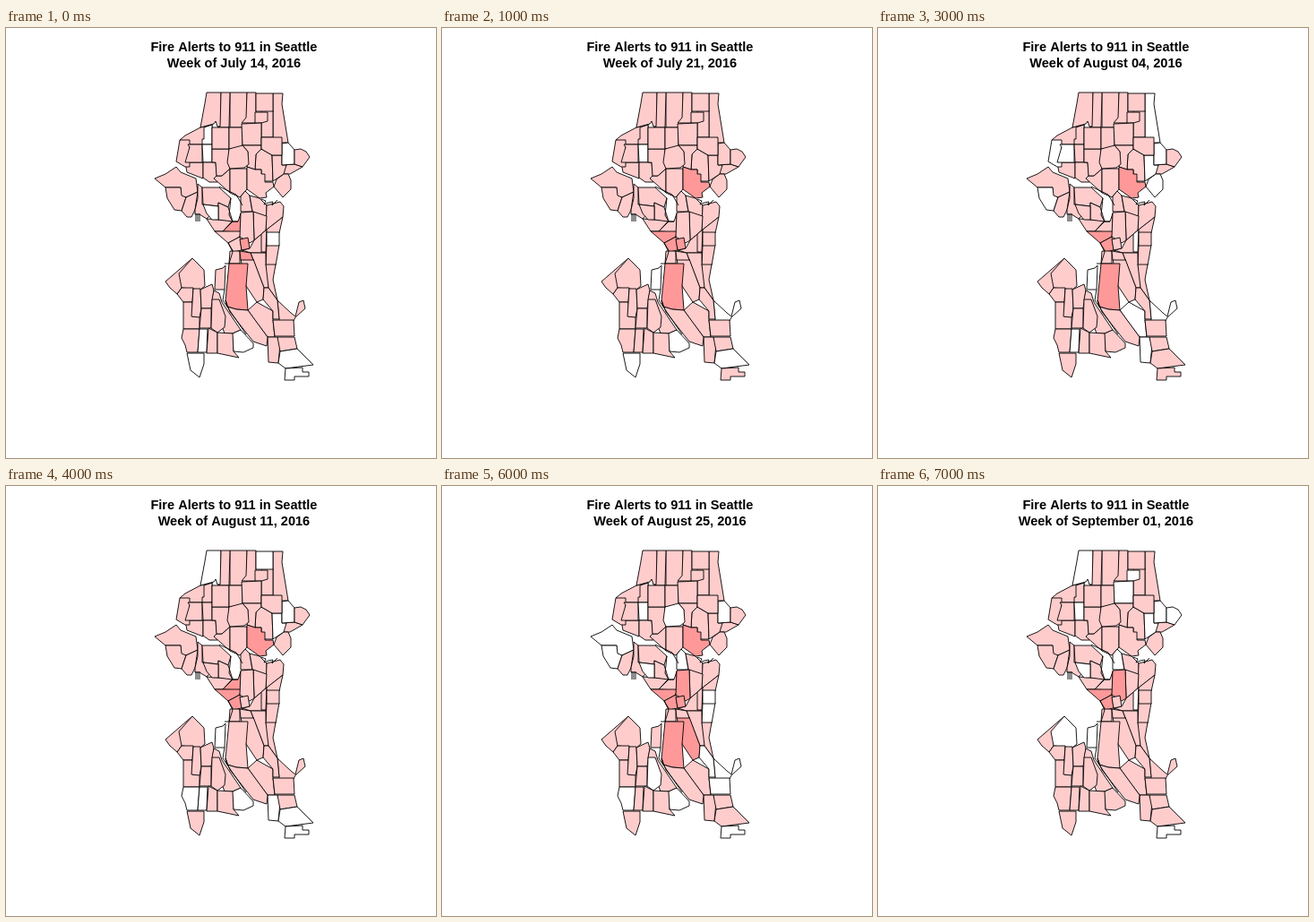
Write an HTML page with a canvas that moves like this. It is 480 px wide and 480 px high and loops after 8 s.

```html
<!DOCTYPE html>
<html>
<head>
<meta charset="utf-8">
<style>
html, body { margin: 0; width: 100%; height: 100%; overflow: hidden; background: #fff; }
canvas { display: block; width: 480px; height: 480px; }
</style>
</head>
<body>
<canvas id="map" width="480" height="480"></canvas>
<script>
const ctx = document.getElementById("map").getContext("2d");
const WEEKS = 8, WEEK_MS = 1000;
const COLORS = { w: "#ffffff", p: "#ffcccc", r: "#ff9999" };

let week = 0;

function line(points) {
  ctx.stroke(new Path2D("M" + points));
}

// Areas overlap: a later one covers the rough edges of those before it.
// One letter per week: white, pink or red.
function area(points, levels = "pppppppp") {
  const path = new Path2D("M" + points + "Z");
  ctx.fillStyle = COLORS[levels[week]];
  ctx.fill(path);
  ctx.stroke(path);
}

function northWest() {
  area("217 111 230 108V130H203L194 125 200 120", "ppwppppp");
  area("224 72H240V110H236L234 104 232 107 217 111 222 84", "ppppwppw");
  area("221 111 230 108V130H219V124H221", "wpwppppp");
  area("200 150H220V168L202 161");
  area("194 125H205V155H200L190 149 191 143", "pppwpppp");
  area("203 130H219V150H200L205 133", "pppwpppp");
  area("219 130H230V150H220", "wwwppwww");
  area("220 150H234L236 172H227L220 167");
}

function northMid() {
  area("250 72H269V111H250");
  area("240 72H250L249 111H236L239 110");
  area("269 72H279V106H263L268 100");
  area("241 165 250 157V184L232 168 235 165");
  area("250 157H269V180L261 189 250 184");
  area("230 135H249L250 157 241 165H235L234 150H230");
  area("230 111H249V135H230");
  area("249 111H264V133L249 135");
}

function northEast() {
  area("298 73H309L308 85 315 128H298", "pppwpppp");
  area("285 92H298V122H285");
  area("279 73H298V93H279", "ppppwppp");
  area("278 94H292V104L285 106H278", "pppppppw");
  area("263 107 285 106V131H264", "pppppppw");
  area("285 135 297 142 298 171H285V158H278L279 141");
  area("264 131H285V135L279 141 278 158 269 155 270 138");
  area("249 135 264 131 270 138 271 152 266 156 250 157 247 150", "ppppppwp");
  area("308 153 322 152 331 155 317 163H308");
  area("310 163H315L318 170V180L309 189 299 177 302 169", "pppwpppp");
  area("269 155 278 158H285V163H289V172H298L299 177 290 184 291 189 283 190 269 180",
    "prrrrrrp");
  area("297 142H308V153H313L310 163 298 171", "pppwwppw");
  area("308 129 315 128 322 136V152L308 153", "wppwwwww");
  area("322 136 329 135 335 138 339 144 331 155 322 152", "pppppppw");
  area("285 122H308V142H297L285 135");
}

function hillsWest() {
  area("166 168 178 163 190 155 195 161 212 168 214 183 201 189H195V178H178", "pppppwwp");
  area("178 178H195L196 187 201 189 196 204 188 203 180 190", "pppwpwwp");
  area("201 189 214 183 211 203 207 211H202L196 204");
  area("224 213 253 215 242 227H233");
  area("214 174 219 178V197H229V208L224 213 216 208H211V203L214 190");
  area("219 178H238L251 190 248 200 237 195V199L220 197");
  area("237 195 248 200 253 216 237 214");
  area("220 197 237 199V214H230L224 207", "wpppppww");
}

function centre() {
  area("262 188 267 182 272 187 275 205H262", "ppppppww");
  area("242 227 253 216H259L262 207V228", "rppprppp".replace("rppprppp", "rppprpp" + "p"));
  area("233 227H262L261 233 248 240", "prrrrrrr");
  area("272 187 283 190 291 198V210H276");
  area("291 198 306 194 310 199 309 211 290 226");
  area("276 205 291 210 290 226 277 237");
  area("262 206 276 205 277 237 272 240 261 233", "pprppprr");
  area("248 240 261 233 263 248 254 250", "prrrrrrr");
  area("277 237 290 226V251H273L263 248 272 246");
  area("261 236 270 234 272 246 263 248", "rrrppprp");
}

function lakeside() {
  area("285 230 291 225 290 250H285", "pppwpppw");
  area("291 225 309 211 305 229H291");
  area("291 242H305L301 265H290", "ppppppwp");
  area("291 228H305V243H291", "wpppppwp");
  area("273 251H290V264L294 280 293 290H288L276 259");
  area("290 264H301L298 281 303 304 293 290");
  area("270 315 280 306 298 316V326L300 345H292L280 329", "pppwpppp");
  area("262 258H276L288 290 287 303 280 306 268 288", "pppppprp");
  area("250 249H261V263H249");
  area("261 249 273 251 276 259H262", "rppppppp");
  area("249 263H270L268 288 270 315 257 314 247 311 245 304", "rrrrpprp");
}

function southEast() {
  area("303 304 318 318 323 322 327 306 332 304 334 313 323 323 321 327H305", "pwpwppwp");
  area("288 290H293L303 304 305 325H298V316L287 303", "ppppppwp");
  area("298 326H321L322 344H300", "ppppppwp");
  area("292 345H303L306 353 304 374 293 373", "pppwwppp");
  area("303 345H322L325 358 306 361");
  area("306 361 325 358 334 367 343 376 312 380 304 374", "wwwpwppp");
  area("312 380 331 379V384H338V389H322V393H311", "wpppwpww");
}

function westTop() {
  area("178 283 208 257 196 290 191 297 183 290");
  area("193 274 208 257 221 270 222 288 217 292 196 290", "pppppwpw");
  area("234 270 242 268 245 265 244 292H233", "pwwwwwpw");
  area("196 290H209L208 306H198L191 297");
  area("198 306H208V322H216V336H198");
  area("209 291H217L218 313 216 323 207 322");
  area("217 292 230 286 232 293 229 313H218");
  area("218 313H229V335H216");
}

function westBottom() {
  area("232 293 238 296 241 306 262 337 253 341H244L230 303");
  area("230 303H238L245 322 244 334 236 340 229 335", "ppppppwp");
  area("198 336H216L214 362H202L200 354 196 346", "ppwpwwwp");
  area("216 336H225L224 362H214", "wpwwwppp");
  area("202 363H221V375L216 390 206 382", "wwwppppp");
  area("226 335 236 340V363H224");
  area("236 340 254 341V361L260 368 236 363");
  area("253 341 262 337 276 352V357L265 362 254 361", "wwwpwwwp");
  area("245 304 247 311 257 314 270 315 292 345 291 355 276 350 250 317");
}

function shores() {
  line("238 177 257 186 264 198");
  line("251 190 249 209 253 216H259");
  for (let x = 212; x < 217; x += 2) line(`${x} 207V216`);
  line("285 191 290 193 288 197 293 195 298 194 297 198 303 192");
  line("248 240 253 250 249 263H244");
  line("244 292 242 304 268 342");
}

function title() {
  const date = new Date(2016, 6, 14 + 7 * week);
  const month = ["July", "August", "September"][date.getMonth() - 6];
  const day = String(date.getDate()).padStart(2, "0");
  ctx.fillStyle = "#000";
  ctx.font = 'bold 14.55px "Liberation Sans", Arial, sans-serif';
  ctx.textAlign = "center";
  ctx.fillText("Fire Alerts to 911 in Seattle", 254.4, 26);
  ctx.fillText(`Week of ${month} ${day}, 2016`, 254.4, 44);
}

function draw() {
  ctx.fillStyle = "#fff";
  ctx.fillRect(0, 0, 480, 480);
  ctx.strokeStyle = "#000";
  ctx.lineWidth = 0.9;
  ctx.lineJoin = "round";
  for (const part of [northWest, northMid, northEast, hillsWest, centre,
    lakeside, southEast, westTop, westBottom, shores, title]) part();
}

const start = performance.now();
let shown = -1;
function tick() {
  week = Math.floor((performance.now() - start) / WEEK_MS) % WEEKS;
  if (week !== shown) {
    shown = week;
    draw();
  }
  requestAnimationFrame(tick);
}
tick();
</script>
</body>
</html>
```
